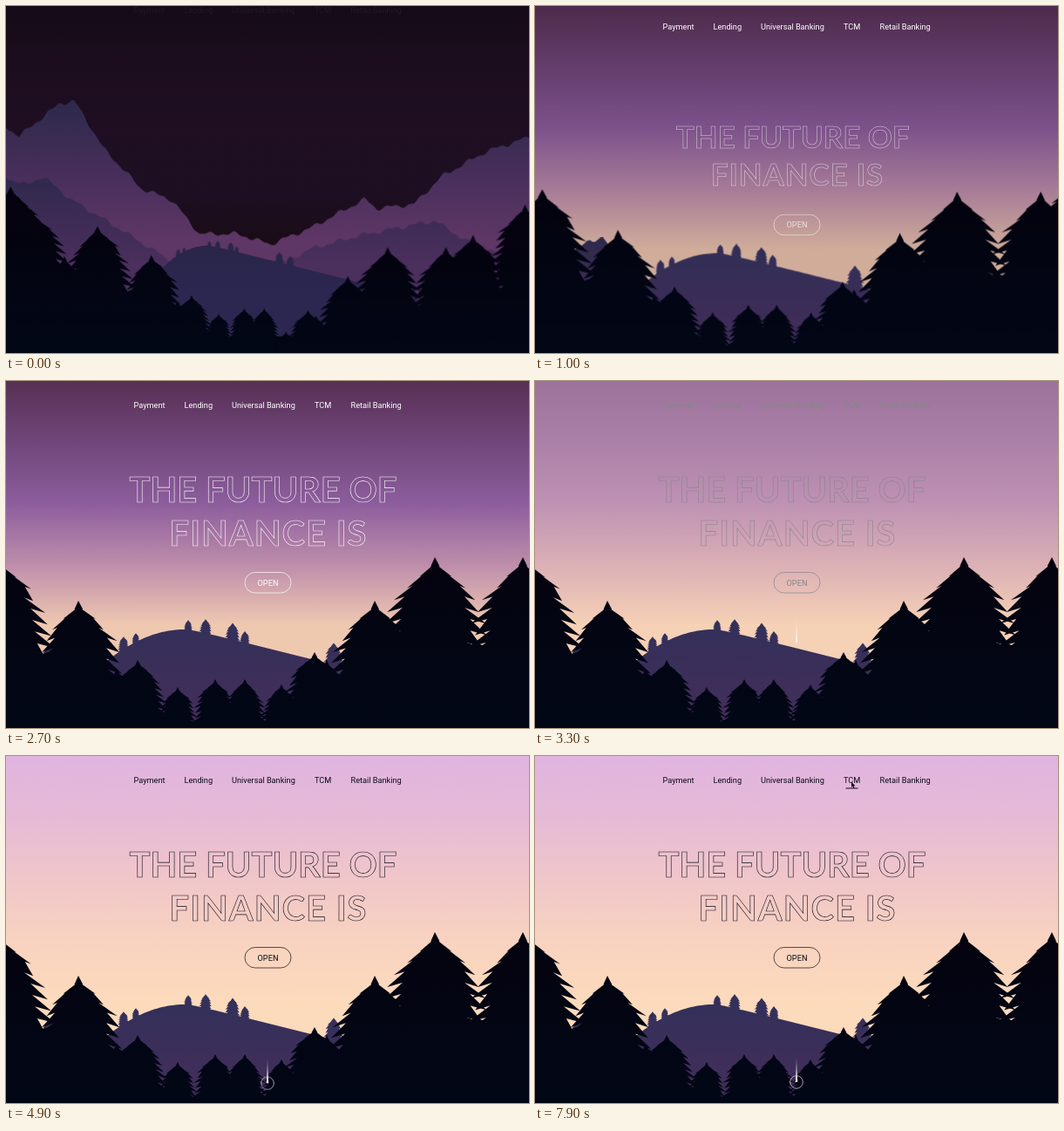
Write an HTML page that moves like this. It is 600 by 398 pixels and loops after 8000 ms.

```html
<!DOCTYPE html>
<html lang="en">
<head>
<meta charset="utf-8">
<title>The future of finance</title>
<style>
html, body { margin: 0; width: 100%; height: 100%; overflow: hidden; background: #140b18; }
svg { display: block; width: 100vw; height: 100vh; }

/* Everything shares one 8 s timeline. */
.rise, .fade, .ink, .day stop, .drop, .ring, .cursor { animation: 8s linear infinite; }
.rise { animation-name: rise; }
.fade { animation-name: fade; }
.quick { animation-name: quick; }
.ink { animation-name: ink; }
.day stop { animation-name: day; }
.drop { animation-name: drop; }
.ring { animation-name: ring; }
.cursor { animation-name: cursor; }

@keyframes rise {
  0% {
    transform: translate(var(--x, 0px), var(--y)) scale(var(--s, 1));
    animation-timing-function: cubic-bezier(.2, .68, .36, 1);
  }
  28.125%, 100% { transform: translate(0px, 0px) scale(1); }
}
@keyframes fade { 0% { opacity: 0; } 17.5%, 100% { opacity: 1; } }
@keyframes quick { 0% { opacity: .05; } 9%, 100% { opacity: 1; } }
/* Night, dusk, then daylight */
@keyframes day {
  0% { stop-color: var(--a); animation-timing-function: cubic-bezier(.2, .68, .36, 1); }
  28.125% { stop-color: var(--b); }
  35% { stop-color: var(--b); animation-timing-function: ease-in-out; }
  47.5%, 100% { stop-color: var(--c); }
}
@keyframes ink {
  0%, 35% { color: #fff; animation-timing-function: ease-in-out; }
  47.5%, 100% { color: #0d0b18; }
}
@keyframes drop {
  0%, 38.75% { transform: translateY(-112px); opacity: 0; }
  41.25% { transform: translateY(-74px); opacity: .7; }
  46.25% { transform: translateY(-4.5px); opacity: 1; animation-timing-function: ease-out; }
  50%, 56.25%, 77.5%, 98.75%, 100% { transform: none; opacity: 1; animation-timing-function: ease-in-out; }
  66.875%, 88.125% { transform: translateY(3px); opacity: 1; animation-timing-function: ease-in-out; }
}
@keyframes ring { 0%, 43% { opacity: 0; } 46%, 100% { opacity: 1; } }
@keyframes cursor {
  0%, 65% { transform: translate(235px, 150px); opacity: 0; animation-timing-function: ease-in-out; }
  67% { opacity: 1; }
  75%, 79.4% { transform: translate(168px, 30px); opacity: 1; animation-timing-function: ease-in-out; }
  83.1%, 86.2% { transform: translate(221px, 30px); animation-timing-function: ease-in-out; }
  90%, 92.5% { transform: translate(295px, 30px); animation-timing-function: ease-in-out; }
  96.9%, 100% { transform: translate(363px, 30px); opacity: 1; }
}

.title { font: 700 40px Lato, "Open Sans", sans-serif; text-anchor: middle; fill: none;
  stroke: currentColor; stroke-width: .6; transform-origin: 295px 150px; }
.label { font: 9.2px Roboto, "Liberation Sans", sans-serif; fill: currentColor; }
</style>
</head>
<body>
<svg viewBox="0 0 600 398" preserveAspectRatio="xMidYMid slice">
  <defs>
    <linearGradient id="sky" class="day" gradientUnits="userSpaceOnUse" x1="0" y1="0" x2="0" y2="280">
      <stop offset="0" style="--a:#140b18;--b:#573054;--c:#e0b4e0"/>
      <stop offset=".25" style="--a:#1c0d1e;--b:#70467a;--c:#e6bad6"/>
      <stop offset=".5" style="--a:#1f0e22;--b:#8c5d9c;--c:#f0c6ca"/>
      <stop offset=".75" style="--a:#1d0e22;--b:#bd8dab;--c:#f8d2c0"/>
      <stop offset="1" style="--a:#190c14;--b:#efc8b0;--c:#fcdabc"/>
    </linearGradient>
    <linearGradient id="hillFill" class="day" gradientUnits="userSpaceOnUse" x1="0" y1="285" x2="0" y2="385">
      <stop offset="0" style="--a:#2a2549;--b:#343059;--c:#33305a"/>
      <stop offset="1" style="--a:#2c2750;--b:#432e5a;--c:#432e5a"/>
    </linearGradient>
    <linearGradient id="farFill" gradientUnits="userSpaceOnUse" x1="0" y1="109" x2="0" y2="268">
      <stop offset="0" stop-color="#2d2a4b"/>
      <stop offset=".57" stop-color="#4a2f5c"/>
      <stop offset="1" stop-color="#5e3766"/>
    </linearGradient>
    <linearGradient id="nearFill" gradientUnits="userSpaceOnUse" x1="0" y1="195" x2="0" y2="295">
      <stop offset="0" stop-color="#30294e"/>
      <stop offset="1" stop-color="#4b2f5d"/>
    </linearGradient>
    <linearGradient id="treeFill" gradientUnits="userSpaceOnUse" x1="0" y1="200" x2="0" y2="400">
      <stop offset="0" stop-color="#04030f"/>
      <stop offset="1" stop-color="#020716"/>
    </linearGradient>
    <linearGradient id="trail" x1="0" y1="0" x2="0" y2="1">
      <stop offset="0" stop-color="#fff" stop-opacity=".15"/>
      <stop offset="1" stop-color="#fff"/>
    </linearGradient>
  </defs>

  <rect width="600" height="398" fill="url(#sky)"/>
  <g class="rise" style="--y:-184px">
    <g id="peaks" transform="translate(0 184)">
      <g id="far" fill="url(#farFill)"></g>
      <g id="near" fill="url(#nearFill)"></g>
    </g>
  </g>
  <g id="hill" class="rise" fill="url(#hillFill)" style="--x:133px;--y:138px;--s:.48"></g>
  <g id="left" class="rise" fill="url(#treeFill)" style="--x:110.5px;--y:115px;--s:.678"></g>
  <g id="right" class="rise" fill="url(#treeFill)" style="--x:112px;--y:143px;--s:.662"></g>

  <g class="ink">
    <g class="fade quick"><g id="nav" class="rise label" style="--y:-23px"></g></g>
    <g class="fade">
      <g class="rise title" style="--x:5px;--y:153px;--s:.123">
        <text x="295" y="139.3">THE FUTURE OF</text>
        <text x="301" y="189.3" letter-spacing="1">FINANCE IS</text>
      </g>
      <g class="rise" style="--y:137px">
        <rect x="274" y="219.5" width="53" height="23.5" rx="11.75" fill="none" stroke="currentColor" stroke-width=".7"/>
        <text class="label" x="300.5" y="234.5" text-anchor="middle">OPEN</text>
      </g>
    </g>
  </g>

  <g class="drop">
    <path d="M300 344L301.2 374H298.8Z" fill="url(#trail)"/>
    <circle class="ring" cx="300" cy="374" r="7.3" fill="none" stroke="#d3c5d6" stroke-width=".8"/>
  </g>
  <path class="cursor" d="M0 0V6L1.4 4.6L2.5 7L3.5 6.6L2.5 4.3H4.5Z" fill="#000"/>
</svg>

<script>
const LOOP = 8000;
const byId = id => document.getElementById(id);

function add(parent, tag, attrs, text = '') {
  const el = document.createElementNS('http://www.w3.org/2000/svg', tag);
  for (const key in attrs) el.setAttribute(key, attrs[key]);
  el.textContent = text;
  return parent.appendChild(el);
}

let seed = 7;
const random = () => (seed = seed * 16807 % 2147483647) / 2147483647;
const polygon = (parent, pts) =>
  add(parent, 'polygon', { points: pts.map(p => p.map(v => v.toFixed(1))).join(' ') });

// Land below the height y = top(x), closed far under the stage.
function land(parent, from, to, top) {
  const pts = [[from, 900]];
  for (let x = from; x <= to; x += 3) pts.push([x, top(x)]);
  polygon(parent, [...pts, [to, 900]]);
}

// Weathered ridge through a few key points.
function ridge(parent, ...keys) {
  const rough = x => 1.8 * Math.sin(x * .21) + 1.2 * Math.sin(x * .47 + 1);
  land(parent, keys[0][0], keys[keys.length - 1][0], x => {
    const i = Math.max(1, keys.findIndex(k => k[0] >= x));
    const [[x0, y0], [x1, y1]] = [keys[i - 1], keys[i]];
    return y0 + (y1 - y0) * (x - x0) / (x1 - x0) + rough(x);
  });
}

// Half width of a fir at depth d below its tip, for size 1.
const spread = d => .62 * d * d / (d * d + .085);

// Fir with drooping branches that lengthen downwards.
function fir(parent, x, y, size, tiers = 15, depth = 1.9) {
  const side = dir => {
    const pts = [];
    for (let i = 1; i <= tiers; i++) {
      const d = depth * (i / tiers) ** 1.15;
      const droop = Math.min(1, d / .5);
      const w = spread(d) * (.9 + .22 * random()) * size * dir;
      pts.push([x + w, y + (d + .07 * droop) * size], [x + w * (1 - .32 * droop), y + (d + .02) * size]);
    }
    return pts;
  };
  polygon(parent, [[x, y], ...side(1), ...side(-1).reverse()]);
}

// Firs with higher tips stand closer and are larger.
const forest = (parent, ...tips) =>
  tips.forEach(([x, y]) => fir(parent, x, y, Math.min(104, .58 * (420 - y))));

ridge(byId('far'), [-6, 134], [15, 149], [62, 111], [79, 109], [112, 163], [155, 209], [190, 222],
  [222, 261], [265, 261], [303, 273], [350, 254], [412, 221], [425, 232], [468, 227], [500, 195], [550, 167], [606, 148]);
ridge(byId('near'), [-6, 194], [24, 205], [42, 195], [75, 222], [125, 252], [210, 305]);
ridge(byId('near'), [312, 298], [350, 278], [405, 263], [492, 246], [530, 270], [606, 302]);

// The hill curves up to its crest, then falls away almost straight.
const hillTop = x => {
  const dx = x - 205;
  return 285 + (dx < 0 ? 27 * (dx / 77) ** 2 : .25 * dx * dx / (dx + 10));
};
const hill = byId('hill');
land(hill, -40, 740, hillTop);
for (const [x, height] of [[135, 14], [149, 10], [209, 11], [229, 16], [260, 19], [274, 13], [376, 25], [402, 22]]) {
  fir(hill, x, hillTop(x) - height, height * .72, 7, 1.7);
}

const left = byId('left'), right = byId('right');
ridge(left, [-400, 230], [45, 312], [190, 388], [336, 390]);
forest(left, [-155, 136], [-120, 174], [-64, 254], [-8, 203], [83, 252], [127, 330], [151, 320], [197, 351], [240, 342], [274, 342]);
ridge(right, [300, 398], [345, 364], [450, 312], [540, 302], [800, 260]);
forest(right, [316, 348], [354, 311], [368, 320], [423, 252], [492, 202], [593, 202], [640, 181], [730, 128]);

// Menu labels; the pointer visits those with a centre in turn.
const nav = byId('nav');
const items = [['Payment', 146.5, 165], ['Lending', 204.5, 221], ['Universal Banking', 259, 295.5],
  ['TCM', 354, 363.5], ['Retail Banking', 395.5]];
items.forEach(([text, x, mid], i) => {
  add(nav, 'text', { x, y: 30.5 }, text);
  if (!mid) return;
  const line = add(nav, 'rect', { x: mid - 7, y: 36.5, width: 14, height: 1 });
  line.style.transformOrigin = `${mid}px 37px`;
  const start = 5900 + 570 * i;
  const at = (ms, k) => ({ offset: Math.min(ms / LOOP, 1), transform: `scaleX(${k})` });
  line.animate([at(0, 0), at(start, 0), at(start + 140, 1), at(start + 480, 1), at(start + 620, 0), at(LOOP, 0)],
    { duration: LOOP, iterations: Infinity });
});
</script>
</body>
</html>
```
